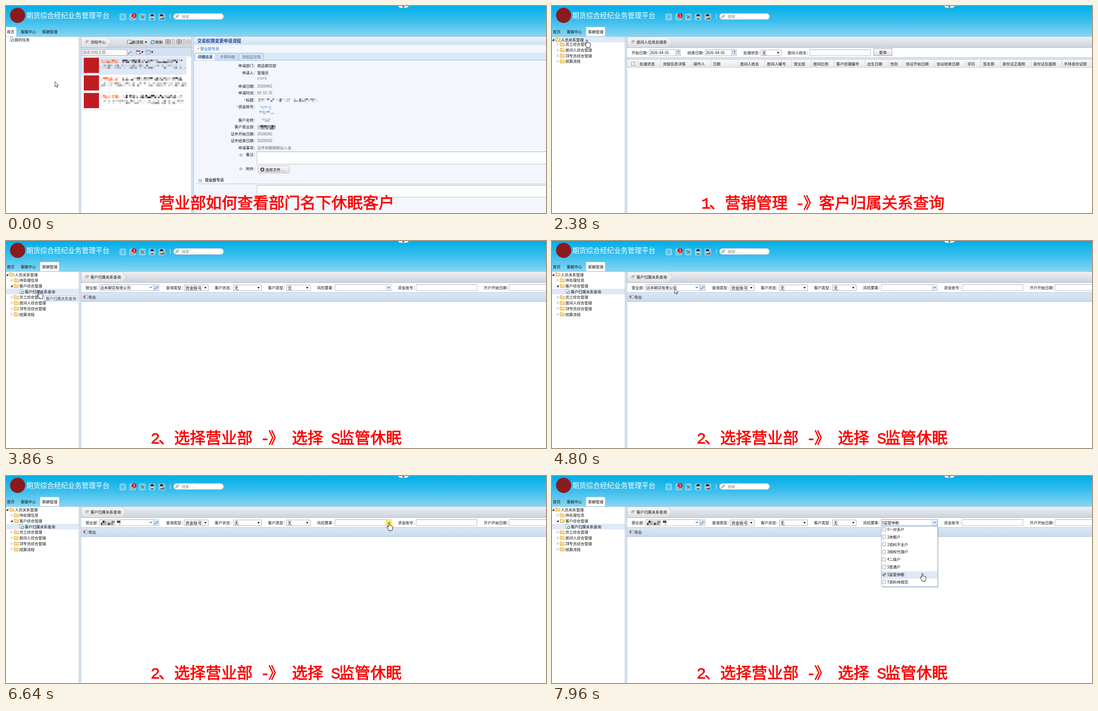
An HTML page for the animation above (8 s loop, 1208x464 px).

```html
<!DOCTYPE html>
<html lang="zh">
<head>
<meta charset="utf-8">
<style>
html,body{margin:0;width:100%;height:100%;overflow:hidden;background:#fff}
svg{display:block;width:100vw;height:100vh}
text{white-space:pre;font-family:"Noto Sans Mono CJK SC","Noto Sans CJK SC","Noto Sans CJK",sans-serif}
text.cap{font-family:"Liberation Mono","Noto Sans CJK SC","Noto Sans CJK",sans-serif;stroke:#f00;stroke-width:.9px}
</style>
</head>
<body>
<svg id="stage" viewBox="0 0 1208 464" xmlns="http://www.w3.org/2000/svg"></svg>
<script>
const LOOP = 8000, ROW = 12.7;
const BLUE = '#99b9de', NAVY = '#15428b', HOVER = '#dfe9f7';

// Text sits on a grid: full-width characters take one em, others half.
const adv = (ch, z) => ch.charCodeAt(0) < 256 ? z / 2 : z;
const wide = (s, z = 8.5) => [...s].reduce((w, ch) => w + adv(ch, z), 0);
function txt(x, cy, s, c = '#111', o = {}) {
  const z = o.z || 8.5, xs = [];
  for (const ch of s) { xs.push(x.toFixed(1)); x += adv(ch, z); }
  return `<text x="${xs.join(' ')}" y="${(cy + z * .38).toFixed(1)}" font-size="${z}" fill="${c}"` +
    `${o.b ? ' font-weight="700"' : ''}${o.k ? ` class="${o.k}"` : ''}>${s}</text>`;
}
const box = (x, y, x2, y2, fill, stroke, r = 0) => {
  const d = stroke ? .5 : 0;
  return `<rect x="${x + d}" y="${y + d}" width="${x2 - x - 2 * d}" height="${y2 - y - 2 * d}" rx="${r}" fill="${fill}"` +
    `${stroke ? ` stroke="${stroke}"` : ''}/>`;
};
const path = (d, fill = 'none', stroke = 'none', w = 1) =>
  `<path d="${d}" fill="${fill}" stroke="${stroke}" stroke-width="${w}"/>`;
const dot = (x, y, r, fill, more = '') => `<circle cx="${x}" cy="${y}" r="${r}" fill="${fill}" ${more}/>`;
const group = (id, s, more = '') => `<g id="${id}" ${more}>${s}</g>`;
const grad = (id, ...cs) => `<linearGradient id="${id}" x2="0" y2="1">` +
  cs.map((c, i) => `<stop offset="${i / (cs.length - 1)}" stop-color="${c}"/>`).join('') + '</linearGradient>';

function mosaic(x, y, w, h, c, seed, fill = .85, cw = 4, ch = 4) {
  let s = '', r = seed * 7919 + 17;
  const rnd = () => (r = (r * 16807) % 2147483647) / 2147483647;
  rnd(); rnd();
  for (let j = 0; j < h; j += ch)
    for (let i = 0; i < w; i += cw) {
      const a = rnd();
      if (rnd() < fill) s += `<rect x="${x + i}" y="${y + j}" width="${Math.min(cw, w - i)}" height="${Math.min(ch, h - j)}" fill="${c}" opacity="${(.12 + .78 * a * a).toFixed(2)}"/>`;
    }
  return s;
}

const lens = (x, y, c = '#4a6f9c') => dot(x + 1, y - 1, 2.5, '#e9f4ff', `stroke="${c}"`) + path(`M${x - 1} ${y + 1}l-3 3`, 'none', c, 1.6);
const caret = (x, y, c = '#111') => path(`M${x - 2.5} ${y - 1.5}h5l-2.5 4z`, c);
const chevron = (x, y) => path(`M${x - 2.5} ${y - 1.5}l2.5 2.5 2.5-2.5`, 'none', '#3c6ea5', 1.4);
const refresh = (x, y) => path(`M${x - 4} ${y - .5}a4 4 0 0 1 7-2m1 3a4 4 0 0 1-7 2`, 'none', '#3b8fd0', 1.8) +
  path(`M${x + 4.5} ${y - 4.5}v4h-4zM${x - 4.5} ${y + 4.5}v-4h4z`, '#3b8fd0');
const pencil = (x, y) => path(`M${x - 4} ${y + 2}l5-5 4 1-4 5z`, '#c9cdd2', '#8c9299', .6) + path(`M${x - 3} ${y}l4-3`, 'none', '#d8703a', 1.4);
const folder = (x, y) => path(`M${x} ${y - 4}h4l1 1.5h5v6.5h-10z`, '#f8d583', '#d8a544', .8) + path(`M${x + 1} ${y - .5}h8`, 'none', '#fff2c4', 1);
const leaf = (x, y) => path(`M${x} ${y - 5}h5l2 2v7h-7z`, '#eaf3fd', '#7595ba', .8) + dot(x + 6, y + 2, 2.6, '#fff', 'stroke="#3f9a4a" stroke-width="1.3"');
const shut = (x, y) => path(`M${x - 1.5} ${y - 2.5}l3.5 2.5-3.5 2.5z`, '#fff', '#a5a5a5', .8);
const open = (x, y) => path(`M${x + 2} ${y - 2.5}v5h-5z`, '#222');

const input = (x, x2, s = '', y = 97, y2 = 112) => box(x, y, x2, y2, '#fff', '#b5b8c8') + path(`M${x + 1} ${y + 1.5}H${x2 - 1}`, 'none', '#e8e8e8') + txt(x + 2, (y + y2) / 2, s);
const select = (x, x2, s) => box(x, 98, x2, 112, '#fff', '#a9a9a9') + txt(x + 3, 105.5, s, '#111', { z: 9.3 }) + caret(x2 - 7, 104.5);
const combo = (x, x2) => input(x, x2) + box(x2 - 12, 97, x2, 112, 'url(#btn)', '#b5c8dd') + chevron(x2 - 6, 104);
const date = (x, x2) => input(x, x2, '2020-04-01') + box(x2 - 12, 97, x2, 112, '#eef3f9', '#b5b8c8') + box(x2 - 9, 100, x2 - 3, 108, '#fff', '#6b83a5') + box(x2 - 6, 101, x2 - 3, 104, '#6d8fc0');

function header() {
  let s = box(0, 0, 1208, 69, 'url(#sky)') + dot(26, 21, 17, '#8b1a1f') +
    txt(45.5, 21.5, '期货综合经纪业务管理平台', '#fff', { z: 15.5 }) +
    path('M877 0h24q-2 4-7 4h-10q-5 0-7-4z', '#fff', '#9ab4c4', .6) + path('M886 2.5l3-2.5 3 2.5z', '#222');
  for (let i = 0; i < 5; i++) s += box(254 + i * 21.8, 17, 268.5 + i * 21.8, 32, '#ffffff55', '#ffffff66', 2);
  s += txt(259, 24.5, '0', '#287fb5') + path('M279 25l5-4 5 3-3 5h-6z', '#e6d7d2', '#9a5a52') + dot(286.5, 21.5, 5.5, '#d3161d') +
    txt(284, 21, '3', '#fff', { z: 9.5 }) + path('M301 21l8 7', 'none', '#3a9a55', 2) + path('M309 22l-7 6', 'none', '#c65a36', 2);
  for (const x of [327, 348]) s += dot(x, 23.5, 3.5, '#f0c9a0') + path(`M${x - 4} 23q0-5 4-5t4 5z`, '#2c2c33') + path(`M${x - 4} 30q4-5 8 0z`, '#3c4a5c');
  s += path('M350 26l4 4m0-4l-4 4', 'none', '#d3161d', 1.5) + path('M367.5 18v11', 'none', '#d9f0fa') +
    box(374, 16, 487.5, 31, '#fff', '#8cb4c9', 7.5) + lens(383, 23, '#777') + txt(393, 23.5, '搜索...', '#888');
  s += group('tabHome', path('M0 68V47h20q3 0 3 3v18z', '#fff')) + group('tabPay', path('M76 68V49q0-2 2-2h39q2 0 2 2v19z', '#fff', '#8fc0d8', .6)) +
    txt(2, 57.5, '首页') + txt(33, 57.5, '客服中心') + txt(81, 57.5, '薪酬管理');
  return s + box(0, 68, 1208, 69, '#9fc3de');
}

const crumb = (x, x2, s) => box(168, 69, x2, 93, 'url(#bar)') +
  path(`M168 69H${x - 10}l10 12-10 12H168z`, 'url(#tip)', '#b4b9c0', .8) + pencil(181, 80) + txt(189, 81, s) + box(168, 93, x2, 94, '#b7c3d2');

const frame = box(163, 69, 168, 464, '#dce7f4') + box(163, 69, 164, 464, '#a9bfd8') + box(167, 69, 168, 464, '#a9bfd8');

function listPane() {
  let s = crumb(236, 415, '流程中心');
  s += box(271, 76, 280, 84, '#fff', '#4b6f9f') + path('M276 82h5v-2l3 3.5-3 3.5v-2h-5z', '#3d9a3f') + txt(282, 81, '新流程') + caret(313, 81) +
    refresh(328, 81) + txt(334, 81, '刷新');
  [357, 368, 382, 393, 404].forEach((x, i) => {
    const c = i % 2 || i > 3 ? '#999' : '#444';
    s += box(x, 75, x + 10, 85, '#f4f4f4', c, i > 3 ? 5 : 1) + path(`M${x + 2.5} 78.5h5m-5 3h5`, 'none', c, 1.4);
  });
  s += box(168, 94, 415, 113, '#d2e0f1') + input(170, 271, '', 97, 111) + txt(172, 104, '搜索流程主题...', '#777') + box(271, 97, 283, 111, 'url(#btn)', '#b5c8dd') + lens(277, 104) +
    box(291, 99, 300, 108, '#fff', '#8b8fa0') + box(292, 100, 299, 103, '#d0563e') + path('M298 105l4 3m0-3l-4 3', 'none', '#d23a2e', 1.3) + caret(305, 103) +
    box(313, 99, 323, 108, '#fff', '#6d83a8') + path('M314 101.5h8m-6 3h5', 'none', '#7f9cc8', 1.5) + caret(327, 103) + box(168, 113, 415, 464, '#fff') + box(168, 114, 404, 153, '#dfe8f6');
  for (let i = 0; i < 3; i++) {
    const y = 116 + i * 39.5;
    s += box(174, y, 208, y + 34, '#c01d22') + mosaic(213, y + 4, 40, 8, '#ff6a3c', i + 3, .95) +
      mosaic(260, y + 4, 134, 8, '#222', i + 11, .8) + mosaic(213, y + 15, 191, 10, '#888', i + 21, .75, 5, 5) + box(168, y + 37, 404, y + 38, '#e6ebf2');
  }
  return s + box(415, 69, 420, 464, '#dce7f4') + box(415, 69, 416, 464, BLUE) + box(419, 69, 420, 464, BLUE);
}

function formPane() {
  let s = box(420, 69, 1208, 464, '#f3f7fd') + box(420, 69, 1208, 87, 'url(#head)') + txt(428, 78, '交易权限变更申请流程', NAVY, { z: 9.8, b: 1 }) +
    dot(430, 95.5, 1.5, '#ee8a3a') + txt(434.5, 95.5, '营业部专员', '#2a68ad') + box(420, 104, 1208, 122, '#dce8f6') + box(420, 121, 1208, 122, BLUE);
  [[422, 469, '详细信息', 1], [472, 518, '步骤明细'], [521, 576, '流程监控图']].forEach(([a, b, t, on]) => {
    s += path(`M${a}.5 122V108q0-2 2-2H${b - 2.5}q2 0 2 2v14z`, on ? '#f3f7fd' : '#d7e5f5', BLUE) +
      (on ? box(a + 1, 121, b - 1, 122, '#f3f7fd') : '') + txt(a + 6.5, 114, t, on ? NAVY : '#416aa3', { b: on });
  });
  const rows = [[134, '申请部门', '商品期货部', '#111'], [149.5, '申请人', '管理员', '#111'], [180, '申请日期', '20200401'], [195, '申请时间', '09:53:55'],
    [210.5, '*标题'], [226, '*资金帐号'], [255.5, '客户名称'], [271, '客户营业部'], [286.5, '证件开始日期', '20100302'],
    [302, '证件结束日期', '20200302'], [317.5, '申请事项', '证件到期限制出入金'], [333, '备注'], [364.5, '附件']];
  for (const [y, label, val = '', c = '#666'] of rows) {
    const name = label.replace('*', '') + ':', x = 558 - wide(name);
    s += txt(x, y, name) + txt(562, y, val, c);
    if (label[0] == '*') s += txt(x - 4.5, y + 1, '*', '#e00');
  }
  s += txt(562, 162, 'clerk', '#777') + mosaic(564, 207, 134, 8, '#666', 31, .8) + mosaic(567, 224, 26, 8, '#3a84e0', 32) +
    mosaic(567, 235, 33, 8, '#999', 33, .8) + mosaic(572, 252, 18, 8, '#888', 34) + mosaic(562, 267, 41, 10, '#111', 35, .95, 4, 5);
  for (const y of [334, 365]) s += dot(525.5, y, 3, '#dbe9f8', 'stroke="#8fb0d6"') + path(`M523.5 ${y}h4`, 'none', '#4a78b0');
  s += input(561, 1212, '', 326, 355) + box(563, 358, 634, 375, 'url(#btn2)', '#b8b8b8', 2) + dot(573.5, 366.5, 4.5, '#444') + path('M571 366.5h5m-2.5-2.5v5', 'none', '#fff', 1.4) +
    txt(580, 367, '选择文件...') + box(431, 388, 438, 395, '#fff', '#8a9cb5') + path('M433 391.5h3', 'none', '#333') +
    txt(445, 390, '营业部专员', '#333', { b: 1 }) + box(424, 398, 1208, 399, '#b9c6d8') + input(561, 1212, '', 401, 429);
  return s;
}

function tree() {
  const y = i => 75.3 + ROW * i;
  const node = (i, s, arrow = shut(13, y(i))) => arrow + folder(18, y(i)) + txt(30, y(i) + .2, s);
  const low = ['员工综合管理', '居间人综合管理', 'IB专员综合管理', '结算流程'].map((s, i) => node(i + 3, s)).join('');
  const kids = node(1, '待处理信息') + node(2, '客户综合管理', group('subShut', shut(13, y(2))) + group('subOpen', open(13, y(2)))) +
    `<g clip-path="url(#subClip)">${group('leaf', leaf(31, y(3)) + txt(42, y(3) + .2, '客户归属关系查询'))}</g>` + group('low', low);
  return `<rect id="hot" width="163" height="12.5" fill="${HOVER}"/>` + group('rootShut', shut(3, 75)) + group('rootOpen', open(3, 75.5)) +
    folder(8, 75) + txt(20, 75.5, '人员关系管理') + `<g clip-path="url(#treeClip)">${group('kids', kids)}</g>`;
}

function agentPage() {
  let s = crumb(270, 1208, '居间人信息处理表') + txt(178, 104.5, '开始日期:') + date(217, 288) + txt(303, 104.5, '结束日期:') + date(342, 413) +
    txt(428, 104.5, '处理状态:') + select(467, 513, '无') + txt(527, 104.5, '居间人姓名:') + input(576, 713) +
    box(719, 95, 761, 112, 'url(#btn2)', '#a8a8a8') + txt(731.5, 104, '查询') +
    box(168, 115, 1208, 120, '#dce7f4') + box(168, 115, 1208, 116, '#a9c0dc') + box(168, 119, 1208, 120, '#a9c0dc') + box(168, 120, 1208, 138, 'url(#col)') + box(168, 137, 1208, 138, '#c5c5c5') +
    box(177, 125, 186, 134, '#eee', '#999');
  const names = '处理状态 流程信息详情 操作人 日期 居间人姓名 居间人编号 营业部 居间比例 客户经理编号 出生日期 性别 协议开始日期 协议结束日期 学历 签名照 身份证正面照 身份证反面照 手持身份证照'.split(' ');
  let x = 191.5;
  for (const n of names) {
    s += path(`M${x} 121v16`, 'none', '#cfcfcf') + txt(x + 4.5, 129.5, n);
    x += n == '日期' ? 60.5 : Math.max(35, wide(n) + 17.8);
  }
  return s;
}

function queryPage() {
  let s = crumb(270, 1208, '客户归属关系查询') + txt(178, 104.5, '营业部:') + input(209, 331) + chevron(324, 104) + box(331, 97, 343, 112, 'url(#btn)', '#b5c8dd') + lens(337, 104) +
    group('firm', txt(211, 104.5, '远禾期货有限公司')) + group('masked', mosaic(212, 100, 32, 10, '#111', 5, .95, 4, 5) + mosaic(248, 100, 8, 10, '#222', 8, .95, 4, 5));
  s += txt(358, 104.5, '查询类型:') + select(398, 453, '资金账号') + txt(467, 104.5, '客户状态:') + select(508, 572, '无') + txt(586, 104.5, '客户类型:') + select(627, 681, '无') +
    txt(696, 104.5, '风险要素:') + combo(736, 862) + group('chosen', txt(738, 104.5, 'S监管休眠')) +
    txt(877, 104.5, '资金账号:') + input(917, 1054) + txt(1069, 104.5, '开户开始日期:') + input(1125, 1212);
  s += box(168, 115, 1208, 136, 'url(#tool)') + box(168, 115, 1208, 116, '#a9c0dc') + box(168, 135, 1208, 136, BLUE) +
    box(174, 121, 182, 129, '#fff', '#7a8ba8') + path('M172 125h5m-2-2.5l3 2.5-3 2.5', 'none', '#d2502e', 1.5) + txt(184, 125.5, '导出');
  const page = box(210, 114, 447, 150, '#00000022') + box(208, 112, 445, 148, '#fff', BLUE) + box(209, 113, 444, 128, HOVER) + box(209, 128, 444, 147, 'url(#tool)') +
    box(209, 97, 331, 112, 'none', '#7eadd9') + mosaic(226, 117, 17, 8, '#444', 41) + mosaic(402, 117, 39, 8, '#222', 47) + path('M254.5 117v7', 'none', '#c8d3e0') +
    path('M216.5 135v7m6-7v7l-4-3.5zM236 135v7l-4-3.5zM336 135v7l4-3.5zM350 135v7l4-3.5zM356.5 135v7', '#a9b9cc', '#a9b9cc', .8) +
    txt(248, 139, '第') + input(259, 279, '', 132, 145) + txt(272, 139, '1') + txt(280, 139, '页 共 1 页') + path('M243.5 133v11m87-11v11m32-11v11', 'none', '#b5c9e2') + refresh(375, 138);
  s += group('firmList', page);
  let list = box(738, 114, 865, 251, '#00000022') + box(736, 112, 863, 248, '#fff', BLUE) + box(736, 97, 863, 112, 'none', '#7eadd9') +
    `<rect id="optHot" x="737" width="125" height="17" fill="${HOVER}"/>`;
  ['0一对多户', '1休眠户', '2资料不全户', '3授权代理户', '4二级户', '5普通户', 'S监管休眠', 'T资料待规范'].forEach((o, i) => {
    const y = 119.5 + 16.9 * i;
    list += box(738, y - 4.5, 747, y + 4.5, '#f3f3f3', '#a3a3a3', 1) + txt(750, y, o);
  });
  return s + group('riskList', list + group('tick', path('M740 220.5l2 2.5 4-5', 'none', '#222', 1.4)));
}

const cap = (id, x, s) => group(id, txt(x, 440.5, s, '#f00', { z: 35.1, k: 'cap' }));

document.getElementById('stage').innerHTML = '<defs>' +
  grad('sky', '#00aee8', '#3cbfed', '#8ad6f2') + grad('bar', '#eef0f3', '#ccd3dc') + grad('tip', '#f7f7f7', '#dcdfe3') + grad('head', '#eef4fc', '#cfdff2') +
  grad('tool', '#dbe7f5', '#cbdbee') + grad('btn', '#f7fbff', '#d5e4f5') + grad('btn2', '#fcfcfc', '#dcdcdc') + grad('col', '#fafafa', '#e6e7e9') +
  '<clipPath id="treeClip"><rect y="81.5" width="163" height="380"/></clipPath><clipPath id="subClip"><rect y="107" width="163" height="14"/></clipPath></defs>' +
  box(0, 0, 1208, 464, '#fff') + header() + frame +
  group('home', leaf(9, 75) + txt(19, 75.5, '我的任务') + listPane() + formPane()) +
  group('tree', tree()) + group('agents', agentPage()) + group('query', queryPage()) +
  cap('cap0', 342, '营业部如何查看部门名下休眠客户') + cap('cap1', 334, '1、营销管理 -》客户归属关系查询') + cap('cap2', 323.5, '2、选择营业部 -》 选择 S监管休眠') +
  group('hint', box(85, 121, 161, 135, '#e9f1fb', BLUE, 1) + txt(89, 128.5, '客户归属关系查询', '#444')) +
  group('mouse', dot(0, 1, 8.3, '#ffe92e', 'id="click" opacity=".75"') +
    group('arrow', path('M0 0V11.5L2.6 9l1.9 4.3 1.7-.8L4.4 8.4H8z', '#fff', '#222', .9)) +
    group('hand', path('M-1.3 1.2a1.3 1.3 0 0 1 2.6 0V6q1.5-.8 2.3.5 1.6-.6 2.2.7 2.2-.3 2.2 1.6V12q0 2-1.5 4v1.5H-.5V16Q-4 11.5-4.6 9q0-1.8 1.8-1.2l1.5 1.7z', '#fff', '#111', 1)));

const el = {};
document.querySelectorAll('[id]').forEach(e => el[e.id] = e);
const show = (id, on) => el[id].style.display = on ? '' : 'none';
const shift = (id, x, y) => el[id].setAttribute('transform', `translate(${x} ${y})`);

// Progress in n hard steps, the first taken at a and the last at b.
const steps = (t, a, b, n) => t < a ? 0 : t >= b ? 1 : (Math.floor((t - a) / (b - a) * (n - 1)) + 1) / n;

// start, end, steps, x, y, arrow while moving, arrow at rest
const MOVES = [[1150, 1450, 5, 95, 56, 1, 0], [1980, 2220, 4, 78, 76, 0, 0], [2530, 2690, 3, 75, 104, 0, 0], [3310, 3470, 3, 75, 112, 0, 0],
  [4260, 4940, 10, 324, 105, 1, 0], [5260, 5340, 2, 324, 119, 0, 0], [5950, 6260, 5, 839, 107, 1, 1], [6410, 6410, 1, 857, 105, 0, 0],
  [6960, 7190, 4, 828.5, 217.5, 0, 0], [7960, 7960, 1, 828.5, 218.5, 0, 0]];
const CLICKS = [[1680, 1760], [3620, 3770], [5020, 5110], [5490, 5570], [6640, 6730]];

function draw(t) {
  const within = (a, b) => t >= a && t < b;
  const inTree = t >= 1830, inQuery = t >= 3770;
  show('tabHome', !inTree); show('tabPay', t >= 1450);
  show('home', !inTree); show('tree', inTree);
  show('agents', inTree && !inQuery); show('query', inQuery);
  show('cap0', !inTree); show('cap1', inTree && !inQuery); show('cap2', inQuery);

  const grow = t < 2300 ? 0 : t < 2380 ? .3 : t < 2450 ? .64 : 1;
  show('rootOpen', t >= 2300); show('rootShut', t < 2300);
  shift('kids', 0, -6 * ROW * (1 - grow));
  const sub = steps(t, 3010, 3160, 3);
  show('subOpen', sub > 0); show('subShut', !sub); show('leaf', sub > 0);
  shift('leaf', 0, ROW * (sub - 1)); shift('low', 0, ROW * sub);
  show('hot', t >= 2140);
  el.hot.setAttribute('y', 69 + ROW * (t < 2610 ? 0 : t < 3390 ? 2 : 3));
  show('hint', within(3470, 4340));

  show('firm', t < 5570); show('masked', t >= 5570);
  show('firmList', within(5110, 5570));
  show('riskList', t >= 6730); show('chosen', t >= 7510); show('tick', t >= 7510);

  let x = 109.5, y = 169.5, arrow = 1;
  for (const [a, b, n, mx, my, mid, end] of MOVES) {
    const p = steps(t, a, b, n);
    if (!p) break;
    x += (mx - x) * p; y += (my - y) * p;
    arrow = p < 1 ? mid : end;
  }
  shift('mouse', x, y);
  show('arrow', arrow); show('hand', !arrow);
  show('click', CLICKS.some(([a, b]) => within(a, b)));
  const opt = Math.floor((y + 3 - 112) / 16.9);
  show('optHot', opt >= 0);
  el.optHot.setAttribute('y', 112 + 16.9 * opt);
}

const t0 = performance.now();
function tick() {
  draw((performance.now() - t0) % LOOP);
  requestAnimationFrame(tick);
}
tick();
</script>
</body>
</html>
```
